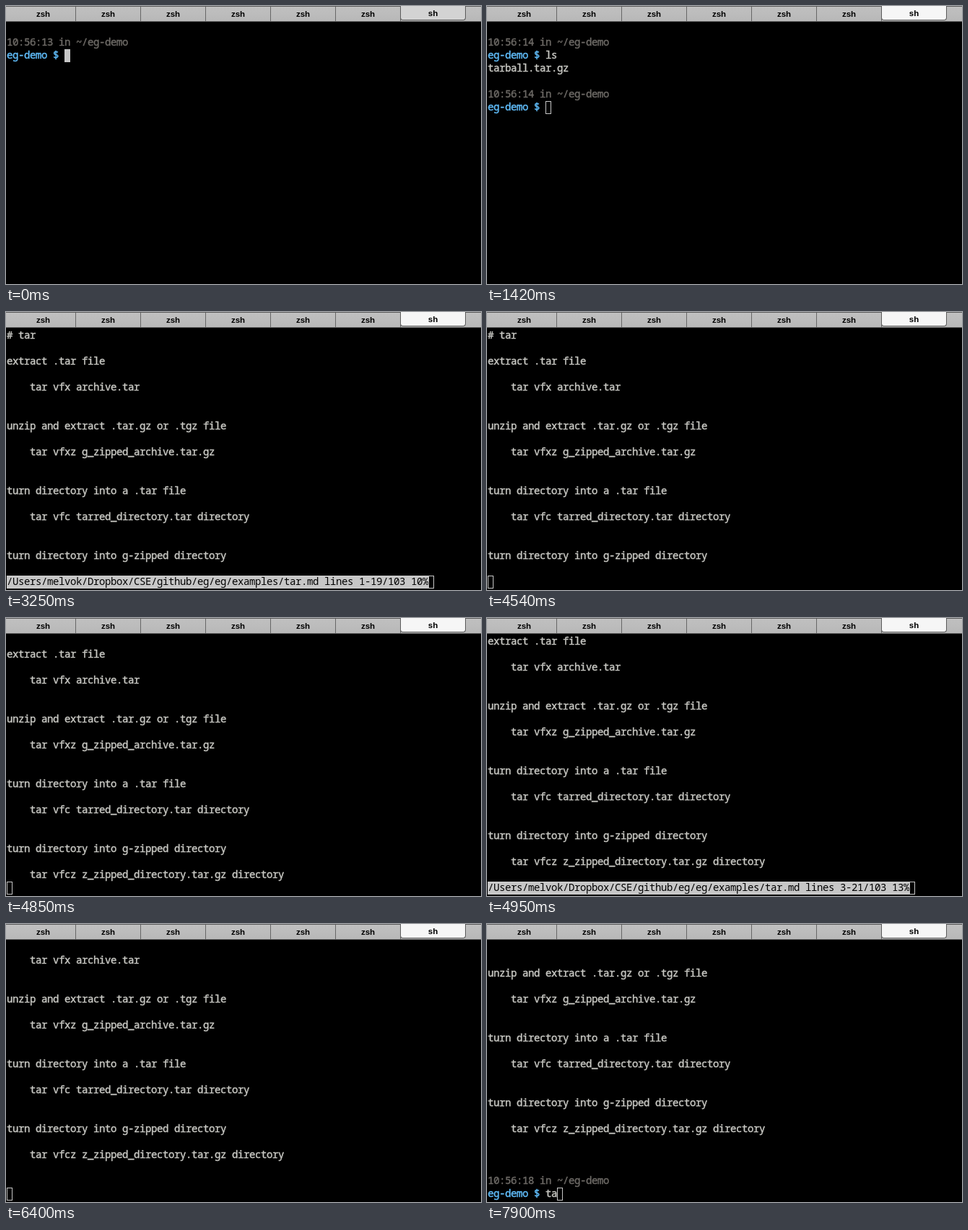
An HTML page for the animation above (8000 ms loop, 658x386 px).

```html
<!DOCTYPE html>
<html lang="en">
<head>
<meta charset="utf-8">
<title>Terminal session</title>
<style>
  html, body { margin: 0; width: 100%; height: 100%; overflow: hidden; background: #000; }
  #bar {
    position: absolute; inset: 0 0 auto; height: 22px; box-sizing: border-box;
    background: linear-gradient(#c0c0c0, #b8b8b8);
    border: solid #5a5a5a; border-width: 1px 0;
    font: bold 11.5px/20px "Liberation Sans", Arial, sans-serif;
  }
  .tab {
    position: absolute; top: 0; width: 90px; height: 20px; box-sizing: border-box;
    border-right: 1px solid #666; text-align: center; color: #000;
  }
  #active {
    top: -1px; width: 91px; margin-left: -1px; border: 1px solid #5a5a5a; border-top: 0;
    border-radius: 0 0 4px 4px;
  }
  #screen, #cursor { position: absolute; margin: 0; }
  #screen {
    left: 1px; top: 23px; color: #c7c7c2;
    font: 500 14px/18px "Noto Sans Mono", "DejaVu Sans Mono", monospace;
    letter-spacing: -0.4px; font-variant-ligatures: none;
    -webkit-text-stroke: 0.45px;
  }
  #cursor { width: 8px; height: 18px; box-sizing: border-box; border: 1px solid #c7c7c7; }
  .clock { color: #6c6965; }
  .prompt { color: #60bdfa; }
  .status {
    display: inline-block; height: 18px; margin-top: 1px; line-height: 16px; vertical-align: top;
    background: #c7c7c7; color: #000; -webkit-text-stroke: 0;
  }
</style>
</head>
<body>
<div id="bar"></div>
<pre id="screen"></pre>
<div id="cursor"></div>
<script>
const LOOP = 8000, FOCUS_CHANGE = 1340;
const PROMPT = 'eg-demo $ ';
const doc = `# tar

extract .tar file

    tar vfx archive.tar


unzip and extract .tar.gz or .tgz file

    tar vfxz g_zipped_archive.tar.gz


turn directory into a .tar file

    tar vfc tarred_directory.tar directory


turn directory into g-zipped directory

    tar vfcz z_zipped_directory.tar.gz directory

`.split('\n');

const $ = id => document.getElementById(id);
$('bar').innerHTML = Array.from({ length: 7 }, (_, i) =>
  `<div class="tab" ${i == 6 ? 'id="active"' : ''} style="left:${7 + 90 * i}px">${i == 6 ? 'sh' : 'zsh'}</div>`
).join('');

const clock = sec => `10:56:${sec} in ~/eg-demo`;
const typed = (t, text, times) => PROMPT + text.slice(0, times.filter(at => at <= t).length);

// One pager screen of 19 lines, with or without its status line
function page(first, percent) {
  const status = percent
    ? `/Users/melvok/Dropbox/CSE/github/eg/eg/examples/tar.md lines ${first}-${first + 18}/103 ${percent}%`
    : '';
  const lines = Array.from({ length: 19 }, (_, i) => doc[first - 1 + i] || '');
  return [...lines, status];
}

function shell(t) {
  const lines = ['', clock(t < 1180 ? 13 : 14), typed(t, 'ls', [830, 920])];
  if (t >= 1180 && t < 1260) lines.push('');
  if (t >= 1260) lines.push('tarball.tar.gz', '', clock(t < 3050 ? 14 : 16),
    typed(t, 'eg tar', [1990, 2130, 2240, 2350, 2460, 2570]));
  if (t >= 3050) lines.push('');
  return lines;
}

const pages = [
  [3150, 1], [3250, 1, 10], [4540, 1], [4640, 2, 13],
  [4850, 2], [4950, 3, 13], [5280, 3], [5380, 4, 13], [6400, 4]
];

function linesAt(t) {
  if (t < 3150) return shell(t);
  if (t >= 6520) return [...page(6).slice(0, 18), clock(18), typed(t, 'ta', [7730, 7900])];
  const [, first, percent] = pages.filter(p => p[0] <= t).pop();
  return page(first, percent);
}

const paint = line => line
  .replace(/^\d\d:.*/, '<span class="clock">$&</span>')
  .replace(/^eg-demo \$/, '<span class="prompt">$&</span>')
  .replace(/^\/Users.*/, '<span class="status">$&</span>');

let shown;
function draw(now) {
  const t = now % LOOP, lines = linesAt(t), focused = t < FOCUS_CHANGE;
  const html = lines.map(paint).join('\n');
  if (html !== shown) $('screen').innerHTML = shown = html;
  const row = lines.length - 1;
  $('cursor').style.left = 1 + 8 * lines[row].length + 'px';
  $('cursor').style.top = 24 + 18 * row + 'px';
  $('cursor').style.background = focused ? '#c7c7c7' : 'none';
  $('active').style.background = focused ? '#d3d3d3' : '#f6f6f6';
}

const start = performance.now();
function tick() {
  draw(performance.now() - start);
  requestAnimationFrame(tick);
}
tick();
</script>
</body>
</html>
```
